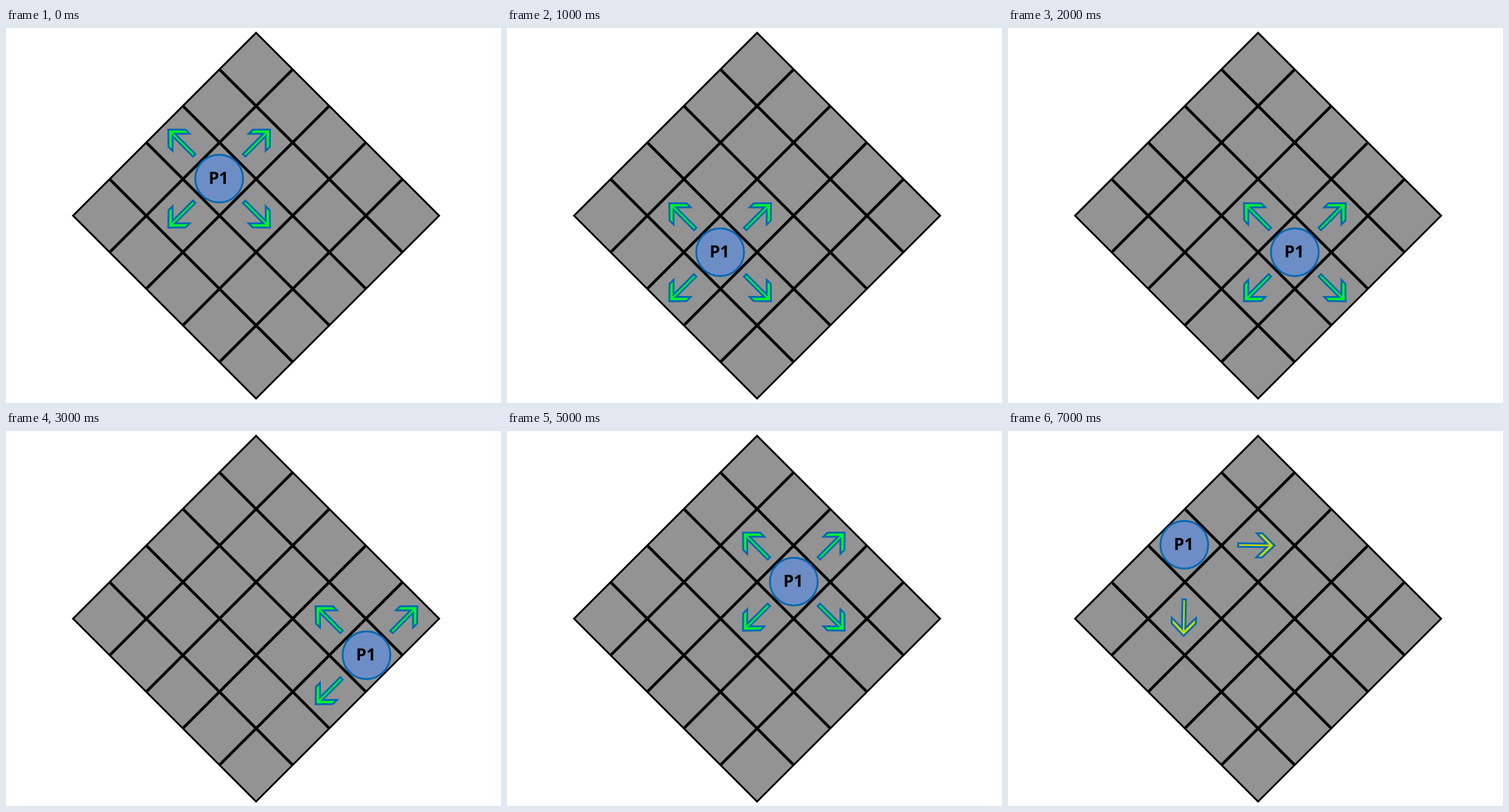
These frames come from a looping animation (860x652 px, 7500 ms). An HTML page with a canvas:

```html
<!DOCTYPE html>
<html lang="en">
<head>
<meta charset="utf-8">
<title>Board moves</title>
<style>
  html, body { margin: 0; width: 100%; height: 100%; overflow: hidden; background: #fff; }
  canvas { display: block; }
</style>
</head>
<body>
<canvas id="stage" width="860" height="652"></canvas>
<script>
const ctx = document.getElementById('stage').getContext('2d');
const STEP_MS = 500;
const MID = { x: 434.5, y: 326.3 };
const HALF = 318;       // centre to corner of the board
const UNIT = 64;        // half the diagonal of a tile
const BLUE = '#0068b4';

// Moves in units; straight moves cover two.
const DIRS = {
  NE: [1, -1], SE: [1, 1], SW: [-1, 1], NW: [-1, -1],
  N: [0, -2], E: [2, 0], S: [0, 2], W: [-2, 0], stay: [0, 0]
};
const START = [-1, -1];
const MOVES = 'SW SE SE NE SE NE NE NW SW NW SW stay N W'.split(' ');
const STRAIGHT_FROM = MOVES.indexOf('stay') + 1;

const DIAGONAL = {
  names: ['NE', 'SE', 'SW', 'NW'], color: '#00f52c',
  rx: 124.9, ry: 120.6, shift: 0, tilt: 0
};
const STRAIGHT = {
  names: ['N', 'E', 'S', 'W'], color: '#c4d900',
  rx: 154.7, ry: 156.3, shift: 2.2, tilt: Math.PI / 180
};

const cells = [START];
for (const name of MOVES) cells.push(add(cells[cells.length - 1], DIRS[name]));

// Arrow pointing right with its tip at the origin.
const upper = [[-21.5, -21], [-31.5, -21], [-13.5, -3], [-63.5, -3]];
const arrowShape = [[0, 0], ...upper, ...upper.map(([x, y]) => [x, -y]).reverse()];

function add([a, b], [c, d]) {
  return [a + c, b + d];
}

function poly(points) {
  ctx.beginPath();
  points.forEach(([x, y]) => ctx.lineTo(x, y));
  ctx.closePath();
}

function paint(fill, stroke, width) {
  ctx.fillStyle = fill;
  ctx.fill();
  ctx.strokeStyle = stroke;
  ctx.lineWidth = width;
  ctx.stroke();
}

function drawBoard() {
  ctx.save();
  ctx.translate(MID.x, MID.y);
  poly([[0, -HALF], [HALF, 0], [0, HALF], [-HALF, 0]]);
  paint('#939393', '#000', 3.2);
  ctx.beginPath();
  for (let i = 1; i < 5; i++) {
    const d = i * HALF / 5;
    for (const side of [-1, 1]) {
      ctx.moveTo(side * d, d - HALF);
      ctx.lineTo(side * (d - HALF), d);
    }
  }
  ctx.lineWidth = 5;
  ctx.stroke();
  ctx.restore();
}

function drawArrow(x, y, [dx, dy], { color, rx, ry, shift, tilt }) {
  const heading = Math.atan2(dy, dx);
  const ux = Math.cos(heading + tilt / 2);
  const uy = Math.sin(heading + tilt / 2);
  ctx.save();
  ctx.translate(x + ux * rx + Math.abs(ux) * shift, y + uy * ry + Math.abs(uy) * shift);
  ctx.rotate(heading + tilt);
  poly(arrowShape);
  paint(color, BLUE, 3.2);
  ctx.restore();
}

function drawToken(x, y) {
  ctx.beginPath();
  ctx.arc(x, y, 41.5, 0, 2 * Math.PI);
  paint('#6d8dc6', BLUE, 3.2);
  ctx.fillStyle = '#000';
  ctx.font = 'bold 29px "Noto Sans", "Open Sans", sans-serif';
  ctx.textAlign = 'center';
  ctx.fillText('P1', x - 1, y + 9.5);
}

const onBoard = ([col, row]) => Math.abs(col) + Math.abs(row) <= 4;

function draw(step) {
  ctx.fillStyle = '#fff';
  ctx.fillRect(0, 0, 860, 652);
  drawBoard();
  const cell = cells[step];
  const x = MID.x - 0.2 + cell[0] * UNIT;
  const y = MID.y - 0.5 + cell[1] * UNIT;
  const mode = step < STRAIGHT_FROM ? DIAGONAL : STRAIGHT;
  for (const name of mode.names) {
    const dir = DIRS[name];
    if (onBoard(add(cell, dir))) drawArrow(x, y, dir, mode);
  }
  drawToken(x, y);
}

const start = performance.now();
function tick(now) {
  draw(Math.floor(Math.max(0, now - start) / STEP_MS) % cells.length);
  requestAnimationFrame(tick);
}
tick(start);
</script>
</body>
</html>
```
